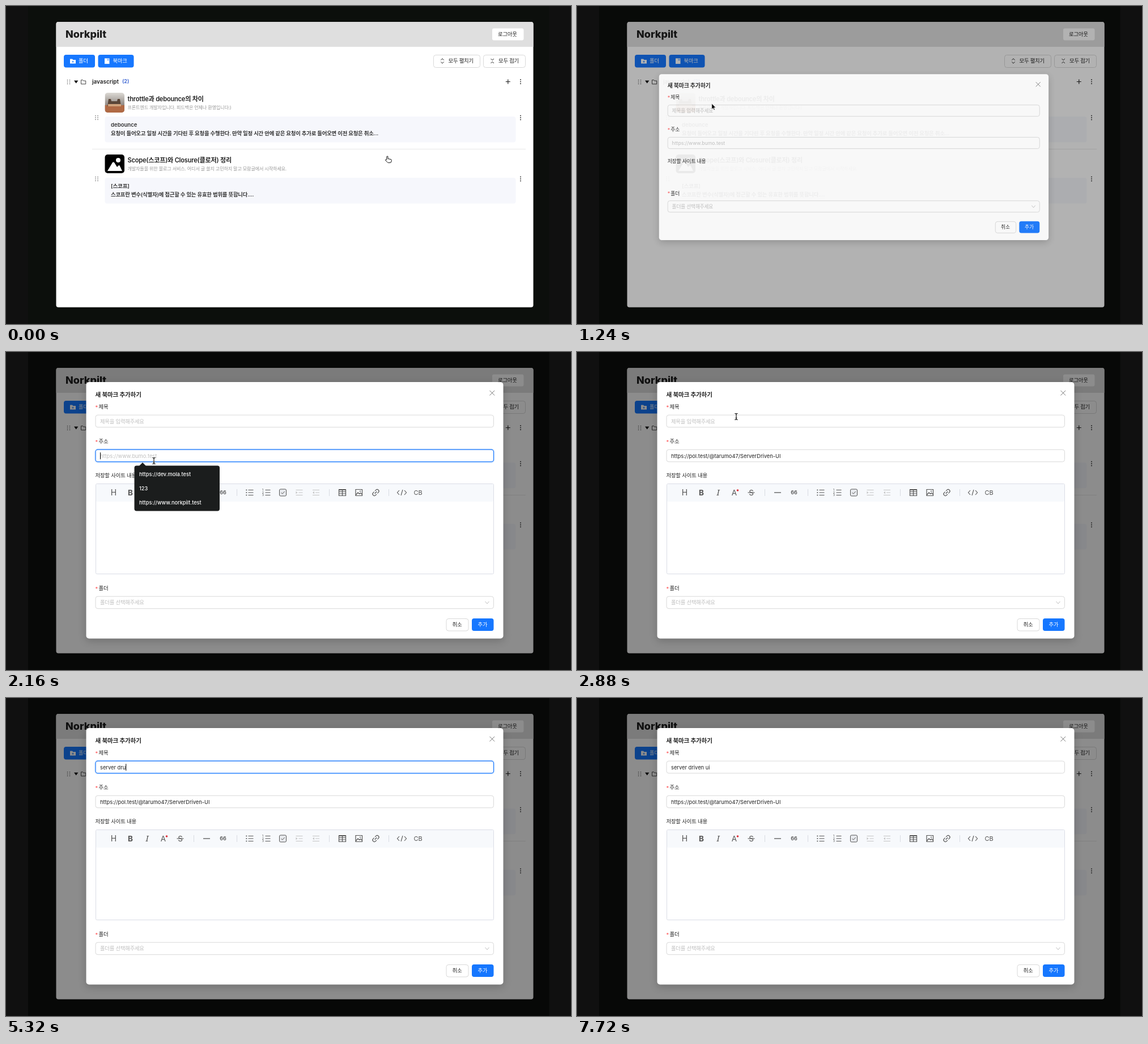
Animation of 997x561 px, one loop 8 s. Source, as an HTML page:

```html
<!DOCTYPE html>
<html lang="ko">
<head>
<meta charset="utf-8">
<style>
  html, body { margin: 0; width: 100%; height: 100%; overflow: hidden; background: #101010; }
  svg { display: block; width: 997px; height: 561px; }
  text { font-family: Inter, "Noto Sans CJK KR", "Noto Sans CJK", sans-serif; white-space: pre; }
  .ko { letter-spacing: -.02em; }
</style>
</head>
<body>
<svg id="stage" viewBox="0 0 997 561"></svg>
<script>
const INK = '#222', GREY = '#bfbfbf', BLUE = '#1677ff', LINE = '#d9d9d9';

// Markup helpers; text is placed by its vertical centre.
const text = (x, y, s, size = 9.4, weight = 400, fill = INK, more = '') =>
  `<text x="${x}" y="${y + size * .36}" font-size="${size}" font-weight="${weight}" fill="${fill}"
    ${/[가-힣]/.test(s) ? 'class="ko"' : ''} ${more}>${s}</text>`;
const rect = (x, y, w, h, r, fill, more = '') =>
  `<rect x="${x}" y="${y}" width="${w}" height="${h}" rx="${r}" fill="${fill}" ${more}/>`;
const line = (d, color = INK, width = 1, more = '') =>
  `<path d="${d}" fill="none" stroke="${color}" stroke-width="${width}" ${more}/>`;
const shape = (d, fill, more = '') => `<path d="${d}" fill="${fill}" ${more}/>`;
const dot = (x, y, r, fill = INK) => `<circle cx="${x}" cy="${y}" r="${r}" fill="${fill}"/>`;
const box = (x, y, w, h, r = 4) => rect(x, y, w, h, r, '#fff', `stroke="${LINE}"`);
const group = (id, body, more = '') => `<g id="${id}" ${more}>${body}</g>`;
const each = (list, f) => list.map(f).join('');

const more3 = (x, y) => each([-3.5, 0, 3.5], d => dot(x, y + d, .9));
const grip = (x, y) => each([-2, 2], dx => each([-3.3, 0, 3.3], d => dot(x + dx, y + d, .8, '#555')));
const card = (y, title, about, head, body) =>
  grip(160, y + 44) + more3(908, y + 44) +
  text(214.5, y + 11, title, 11.1, 600) + text(214.5, y + 26, about, 8.1, 400, '#999') +
  rect(174.5, y + 42, 725, 45.5, 4, '#f6f7fc') +
  text(185, y + 57, head, 9.6, 600, '#333') + text(185, y + 72, body, 9.4, 600, '#333');

const photo =
  `<g clip-path="url(#avatar)">
    ${rect(174.5, 153, 35, 35, 0, 'url(#sky)')}
    ${rect(174.5, 175, 35, 13, 0, '#b06a45')}
    ${shape('M181 164h4l1 4h10l1-4h4l2 13h-24z', '#5a4638')}
    ${shape('M180 173h23v4h-23z', '#cfa27c')}
  </g>`;
const picture =
  rect(174.5, 262, 34.5, 33, 5, '#000') + dot(198, 272, 4, '#fff') +
  shape('M179 291 188 276Q189.500 274.500 191 276L196 284 198.500 281.500Q199.500 280.500 200.500 281.500L205 291Z', '#fff');

const page =
  rect(39, 0, 919.5, 561, 0, '#0c0f0c') +
  rect(88.5, 28, 842, 503.5, 4, '#fff') +
  shape('M88.500 72V32q0-4 4-4H926.500q4 0 4 4V72Z', '#dfdfdf') +
  text(105, 49.5, 'Norkpilt', 18, 800, '#1c1c1c') +
  rect(858, 39.5, 55.5, 21, 3, '#fff') + text(868, 50, '로그아웃', 9.4, 500) +
  rect(102, 86, 55, 22.5, 4, BLUE) + rect(162.5, 86, 63, 22.5, 4, BLUE) +
  shape('M113 93.500h4l1.300 1.500H123V101.500H113Z', '#fff') + line('M118 96.500v3.400M116.300 98.200h3.400', BLUE, .9) +
  shape('M174 92.300h8.500v9.800H174Z', '#fff') + line('M179 92.500v3.500l1-.8 1 .8v-3.500', BLUE, .6) +
  text(128, 97, '폴더', 9.4, 500, '#fff') + text(188.5, 97, '북마크', 9.4, 500, '#fff') +
  box(754.5, 86.5, 82, 22) + box(842.5, 86.5, 74, 22) +
  line('M767.300 95.500l2.700-2.700 2.700 2.700M767.300 98.500l2.700 2.700 2.700-2.700M855.500 93l2.700 2.700 2.700-2.700M855.500 101l2.700-2.700 2.700 2.700') +
  text(780.5, 97, '모두 펼치기', 9.4, 500) + text(869, 97, '모두 접기', 9.4, 500) +
  grip(110.5, 134) + shape('M120 131.500h7.400l-3.700 5z', '#111') +
  line('M132.500 130.500h3l1.200 1.500h4v5.700h-8.200z', '#333', .9) +
  text(152, 133, 'javascript', 9.9, 600) + text(205, 133, '(2)', 9, 600, '#2f5bd0') +
  line('M881.800 133.500h8M885.800 129.500v8', INK, 1.2) + more3(908, 133.5) +
  card(153, 'throttle과 debounce의 차이', '프론트엔드 개발자입니다. 피드백은 언제나 환영입니다:)', 'debounce',
    '요청이 들어오고 일정 시간을 기다린 후 요청을 수행한다. 만약 일정 시간 안에 같은 요청이 추가로 들어오면 이전 요청은 취소...') +
  photo + line('M152 252.500H917', '#e8e8e8') +
  card(261, 'Scope(스코프)와 Closure(클로저) 정리', '개발자들을 위한 블로그 서비스. 어디서 글 쓸지 고민하지 말고 모람글에서 시작하세요.', '[스코프]',
    '스코프란 변수(식별자)에 접근할 수 있는 유효한 범위를 뜻합니다....') + picture;

const label = (y, s) => text(157.5, y + 1, '*', 9.4, 400, '#ff4d4f') + text(163.5, y, s);
const field = (id, y, hint) =>
  box(158, y, 702.5, 21.5) +
  group(id + 'Focus', rect(156.8, y - 1.2, 704.9, 23.9, 5, 'none', 'stroke="#e6f1ff" stroke-width="2"') +
    rect(158, y, 702.5, 21.5, 4, 'none', `stroke="${BLUE}" stroke-width="1.2"`)) +
  text(166, y + 11, hint, 9.3, 400, GREY, `id="${id}Hint"`) +
  text(166, y + 11, '', 9.3, 400, INK, `id="${id}Text"`) +
  rect(166, y + 5, 1, 12, 0, '#000', `id="${id}Caret"`);

const form =
  text(157.5, 75, '새 북마크 추가하기', 10.6, 600) + line('M853.500 68l8.600 8.600m0-8.600l-8.600 8.600', '#777') +
  label(97, '제목') + field('title', 111.2, '제목을 입력해주세요') +
  label(158, '주소') + field('url', 172.2, 'https://www.bumo.test') +
  text(157.5, 217.5, '저장할 사이트 내용');

const TOOL = '#555', OFF = '#c4c4c4';
const tool = (x, s, size = 12.5, weight = 400, extra = '') =>
  text(x, 248, s, size, weight, TOOL, 'text-anchor="middle" ' + extra);
const rows = (x, color = TOOL) => line(`M${x} 243.500h9M${x} 248h9M${x} 252.500h9`, color, 1.2);
const indent = (x, arrow) => line(`M${x} 243.500h12M${x + 5} 248h7M${x} 252.500h12`, OFF, 1.2) + shape(arrow, OFF);
const toolbar =
  rect(158.5, 232.5, 702, 159, 2, '#fff', 'stroke="#dadde6"') + rect(159, 233, 701, 31, 2, '#f7f9fc') +
  tool(190, 'H', 14) + tool(219.5, 'B', 13.5, 700) + tool(249, 'I', 14, 400, 'font-style="italic" style="font-family:Noto Serif,serif"') +
  tool(277.5, 'A', 13.5) + dot(283.5, 244, 1.8, '#e0303a') +
  tool(307.5, 'S', 13.5) + line('M301.500 248h12', TOOL, 1.1) + line('M348 248h12', TOOL, 1.3) + tool(383, '66', 9, 600) +
  line(each([331, 407, 570, 675], x => `M${x}.500 242v12`), '#d8dbe2') +
  each([243.5, 248, 252.5], y => dot(424.3, y, 1, TOOL)) + rows(427.5) +
  each([1, 2, 3], n => text(452, 239.2 + n * 4.4, n, 4.6, 500, TOOL)) + rows(457.5) +
  rect(482.5, 242, 12, 12, 2, '#e9ebef', `stroke="${TOOL}"`) + line('M485.500 248l2.200 2.200 4-4.200', TOOL) +
  indent(511.5, 'M511.500 245.700l3 2.300-3 2.300z') + indent(541, 'M544 245.700l-3 2.300 3 2.300z') +
  line('M587.500 242.500h12v11h-12zM587.500 246.500h12M587.500 250h12M593.500 242.500v11', TOOL, 1.2) + line('M587.500 243h12', TOOL, 2) +
  line('M617 242.500h11.500v11H617zM617.500 252l3.500-4 2.500 2.500 2-2 3 3', TOOL, 1.2) + dot(625, 245.5, 1, TOOL) +
  `<g transform="rotate(-45 652.500 248)">${line('M651.500 251h-2.500a3 3 0 0 1 0-6h2.500M653.500 245h2.500a3 3 0 0 1 0 6h-2.500M650 248h5', TOOL, 1.2)}</g>` +
  line('M694 244l-3.500 4 3.500 4M703 244l3.500 4-3.500 4M700 243l-3 10', TOOL, 1.1) + tool(727, 'CB', 11);

const footer =
  label(417, '폴더') + box(158, 431.2, 702.5, 21.5) + text(166, 441.8, '폴더를 선택해주세요', 9.3, 400, GREY) +
  line('M845.500 440l3.500 4 3.500-4', GREY) +
  box(777, 470.5, 39, 21.5) + text(787.5, 481, '취소') +
  rect(822, 470, 38.5, 22, 4, BLUE) + text(832.5, 481, '추가', 9.4, 400, '#fff');

const popup =
  shape('M235 201l6-6 6 6z', '#1b1d1d') + rect(226.5, 200.5, 150.5, 80, 4, '#1b1d1d') +
  text(235, 215.5, 'https://dev.mola.test', 9.2, 500, '#fff') + text(235, 240.5, '123', 9.2, 500, '#fff') +
  text(235, 266, 'https://www.norkpilt.test', 9.2, 500, '#fff');

const cursors =
  group('hand', shape('M-1.200 6V1q0-1 1.100-1t1.100 1v3.500l5 1q1.500.5 1.300 2l-.6 2.500q-.3 1.500-2 1.500H1.500q-1 0-1.700-1L-3.600 6.800q.3-1.300 1.500-.8z', '#fff', 'stroke="#111"')) +
  group('arrow', shape('M0 0V10.500L2.400 8.200 4 11.800 5.600 11.100 4 7.600H7.300Z', '#000', 'stroke="#fff" stroke-width=".8"')) +
  group('beam', each([['#fff', 2.2], ['#111', 1.2]], ([c, w]) =>
    line('M-2.700-5.500Q0-5.500 0-4V4Q0 5.500-2.700 5.500M2.700-5.500Q0-5.500 0-4M0 4Q0 5.500 2.700 5.500M-1.300 2.500H1.300', c, w)));

stage.innerHTML =
  `<defs>
    <clipPath id="avatar">${rect(174.5, 153, 34.5, 35, 5, '#000')}</clipPath>
    <linearGradient id="sky" x2="0" y2="1"><stop stop-color="#dcd9d4"/><stop offset=".65" stop-color="#8d8580"/></linearGradient>
  </defs>` + page + rect(39, 0, 919.5, 561, 0, '#000', 'id="mask"') +
  group('modal', rect(141.5, 53, 736, 452.5, 5, '#fff', 'id="panel" style="filter:drop-shadow(0 4px 7px #0003)"') +
    group('upper', form) + group('editor', toolbar) + group('lower', footer) + group('suggest', popup)) +
  group('pointer', cursors);

const el = id => document.getElementById(id);
const set = (id, name, value) => el(id).setAttribute(name, value);
const show = (id, on) => set(id, 'display', on ? 'inline' : 'none');
const clamp = v => Math.min(1, Math.max(0, v));
const bezier = (a, b, u) => 3 * a * u * (1 - u) ** 2 + 3 * b * u * u * (1 - u) + u ** 3;

// cubic-bezier(.08, .82, .17, 1)
function easeOutCirc(p) {
  let lo = 0, hi = 1;
  for (let i = 0; i < 20; i++) {
    const mid = (lo + hi) / 2;
    if (bezier(.08, .17, mid) < p) lo = mid; else hi = mid;
  }
  return bezier(.82, 1, hi);
}

const track = [[520, 673, 265], [1040, 189.5, 88], [1160, 189.5, 88], [1320, 286, 256],
  [1880, 261, 192], [2500, 261, 192], [2880, 281, 114], [3280, 288, 122]];
function pointerAt(t) {
  const next = track.findIndex(k => k[0] > t);
  if (next < 1) return track[next ? track.length - 1 : 0].slice(1);
  const [t0, x0, y0] = track[next - 1], [t1, x1, y1] = track[next];
  const p = (t - t0) / (t1 - t0), e = p * p * (3 - 2 * p);
  return [x0 + (x1 - x0) * e, y0 + (y1 - y0) * e];
}

// "<" is backspace
const keys = 'server dru<iven ui';
const keyTimes = [3800, 3840, 3880, 3880, 4040, 4080, 4160, 4360, 4520, 5040, 5560, 5680, 5840, 6000, 6160, 6280, 6360, 6480];
const URL_TEXT = 'https://pol.test/@tarumo47/ServerDriven-UI', PASTE = 2440;

function updateField(id, t, value, focus, blur, lastKey) {
  const label = el(id + 'Text');
  label.textContent = value;
  show(id + 'Hint', !value);
  set(id + 'Focus', 'opacity', clamp((t - focus) / 200) - clamp((t - blur) / 200));
  show(id + 'Caret', t >= focus && t < blur && (t - Math.max(focus, lastKey)) % 1000 < 500);
  set(id + 'Caret', 'x', 166 + (value ? label.getComputedTextLength() : 0));
}

function draw(now) {
  const t = Math.floor(now % 8000 / 40) * 40; // 25 pictures per second

  set('mask', 'opacity', .45 * clamp((t - 1106) / 200));
  const zoom = easeOutCirc(clamp((t - 1127) / 300)), scale = .2 + .8 * zoom;
  const open = t >= 1440, shift = open ? 0 : 69.5;
  show('modal', t > 1127);
  set('modal', 'opacity', zoom);
  set('modal', 'transform', `translate(190.7 88) scale(${scale}) translate(-190.7 -88)`);
  set('panel', 'y', 53 + shift);
  set('panel', 'height', 452.5 - 2 * shift);
  set('upper', 'transform', `translate(0 ${shift})`);
  set('lower', 'transform', `translate(0 ${-shift})`);
  show('editor', open);
  show('suggest', t >= 1960 && t < PASTE);

  let typed = '', lastKey = 0;
  keyTimes.forEach((time, i) => {
    if (t < time) return;
    typed = keys[i] === '<' ? typed.slice(0, -1) : typed + keys[i];
    lastKey = time;
  });
  updateField('title', t, typed, 3060, 6960, lastKey);
  updateField('url', t, t < PASTE ? '' : URL_TEXT, 1960, 2640, t < PASTE ? 0 : PASTE);

  const [x, y] = pointerAt(t);
  set('pointer', 'transform', `translate(${x} ${y})`);
  show('pointer', t < 3800);
  show('hand', t < 1100);
  show('arrow', t >= 1100 && t < 1260);
  show('beam', t >= 1260);
}

const start = performance.now();
function tick() {
  draw(performance.now() - start);
  requestAnimationFrame(tick);
}
tick();
</script>
</body>
</html>
```
